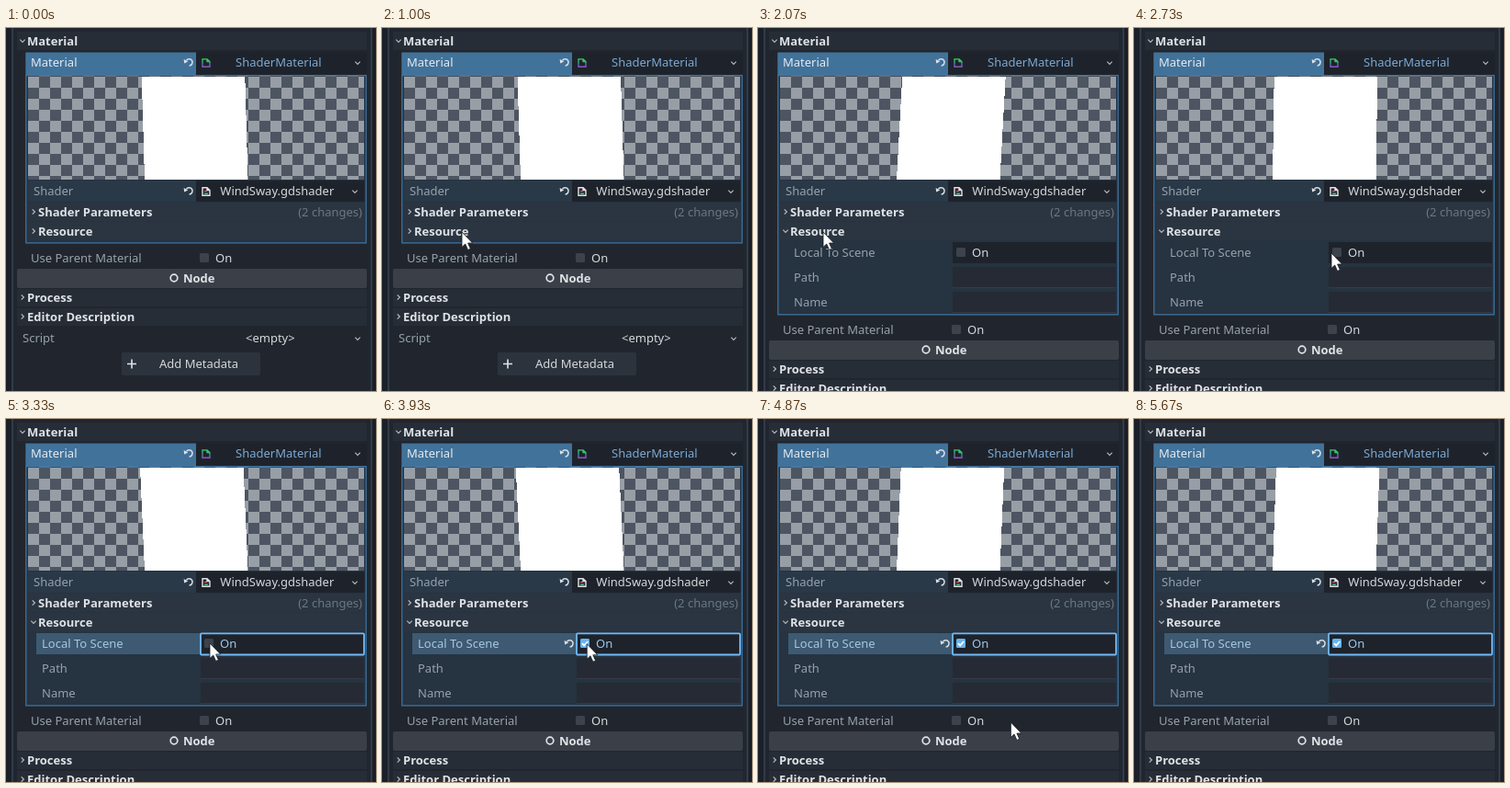
An HTML page that plays this animation: 403x395 px, repeating every 5.79 s.

```html
<!DOCTYPE html>
<html lang="en">
<head>
<meta charset="utf-8">
<title>Inspector</title>
<style>
  html, body { margin: 0; width: 100%; height: 100%; overflow: hidden; background: #21262e; }
  svg { display: block; width: 403px; height: 395px; }
  text { font: 13px "Noto Sans", "Open Sans", sans-serif; fill: #d5d8dc; white-space: pre; }
  .b { font-weight: 700; fill: #dfe2e6; }
  .dim { fill: #98a1ab; }
  .faint { fill: #6c7783; }
  .link { fill: #7da9d2; }
  .line { fill: none; stroke: #b4bac1; stroke-width: 1.2; }
  .sec { fill: #272d37; }
  .sub { fill: #2b3541; }
  .val { fill: #1e232b; }
  .field { fill: #252a35; }
  .box { fill: #3d434c; }
  .focus #on { fill: #9cc6ec; }
  .focus #localLabel { fill: #a9c6de; }
  #open, #focus, #checked, #arrow, #beam { visibility: hidden; }
</style>
</head>
<body>
<svg viewBox="0 0 403 395" id="stage">
  <defs>
    <pattern id="checker" x="24" y="53" width="24" height="24" patternUnits="userSpaceOnUse">
      <path fill="#4e5562" d="M0 0h24v24H0z"/>
      <path fill="#989ea5" d="M0 0h12v12H0zM12 12h12v12H12z"/>
    </pattern>
    <linearGradient id="rim" x1="0" y1="0" x2="0" y2="1">
      <stop offset="0" stop-color="#3fd05c"/>
      <stop offset=".45" stop-color="#3fae8c"/>
      <stop offset=".7" stop-color="#5a6ae0"/>
      <stop offset="1" stop-color="#a860d8"/>
    </linearGradient>
    <clipPath id="view"><path d="M24 52.5h366V165H24z"/></clipPath>
    <path id="right" class="line" d="M-1.3 -2.7L1.4 0L-1.3 2.7"/>
    <path id="down" class="line" d="M-2.7 -1.3L0 1.4L2.7 -1.3"/>
    <g id="undo">
      <path fill="none" stroke="#e0e3e7" stroke-width="1.5" d="M-2.6 -1.6A3.6 3.6 0 1 1 .6 3.9"/>
      <path fill="#e0e3e7" d="M-5.4 -3L-4.8 1.6L-.8 -.4z"/>
    </g>
    <path id="page" d="M-4 -4.2H1L4 -1.4V4.2H-4zM1 -4.2V-1.4H4"/>
  </defs>

  <path fill="#21262e" d="M0 0h403v395H0z"/>
  <path fill="#1b2028" d="M0 0h6v395H0zM399 0h4v395h-4z"/>
  <path fill="#303b49" d="M6 0h2v395H6zM397 0h2v395h-2z"/>

  <path class="sec" d="M12 4h381v20H12z"/>
  <use href="#down" x="18" y="14"/>
  <text class="b" x="23" y="19">Material</text>

  <path fill="#41729a" d="M21.3 26.5H207V51H21.3z"/>
  <path class="val" d="M207 26.5h185.5V51H207z"/>
  <text x="27" y="42" style="fill:#e6ebf0">Material</text>
  <use href="#undo" x="199" y="37"/>
  <use href="#page" x="218" y="38" fill="none" stroke="url(#rim)" stroke-width="1.3"/>
  <text class="link" x="250" y="42">ShaderMaterial</text>
  <use href="#down" x="383" y="38"/>

  <rect id="panel" x="21.8" y="51.6" width="370.4" height="182.3" fill="#263340" stroke="#3f78a8" stroke-width="1.2"/>
  <path fill="url(#checker)" d="M24 52.5h366V165H24z"/>
  <polygon id="quad" fill="#fff" clip-path="url(#view)" shape-rendering="crispEdges"/>

  <path fill="#293948" d="M24 166h183v23H24z"/>
  <path class="val" d="M207 166h183.5v23H207z"/>
  <text class="dim" x="30" y="182">Shader</text>
  <use href="#undo" x="199" y="177"/>
  <use href="#page" x="218" y="178" fill="none" stroke="#e0e3e7" stroke-width="1.4"/>
  <path fill="none" stroke-width="1.3" stroke="#e0566a" d="M216 177.5h3"/>
  <path fill="none" stroke-width="1.3" stroke="#48d07c" d="M216 180.2h4"/>
  <text x="233.3" y="182">WindSway.gdshader</text>
  <use href="#down" x="380" y="178"/>

  <path class="sub" d="M24 190h366v20H24zM24 211h366v20H24z"/>
  <use href="#right" x="30" y="200"/>
  <text class="b" x="35" y="205">Shader Parameters</text>
  <text class="faint" x="388" y="205" text-anchor="end">(2 changes)</text>
  <use id="fold" href="#right" x="30" y="221"/>
  <text class="b" x="35" y="226">Resource</text>

  <g id="open">
    <path class="val" d="M212 233h178v23H212z"/>
    <path class="field" d="M212 260h178v22H212zM212 287h178v22H212z"/>
    <path fill="none" stroke="#343a46" d="M212 282.5h178M212 309.5h178"/>
    <g id="focus">
      <path fill="#3d5a72" d="M33 233h179v23H33z"/>
      <rect x="212" y="233.3" width="178" height="23.2" rx="1" fill="#1e232b" stroke="#70bafa" stroke-width="1.8"/>
    </g>
    <text class="dim" id="localLabel" x="39" y="249">Local To Scene</text>
    <rect class="box" x="216" y="239" width="10" height="10" rx="1.5"/>
    <g id="checked">
      <use href="#undo" x="204" y="244"/>
      <rect x="216" y="239" width="10" height="10" rx="1.5" fill="#68b4f2"/>
      <path fill="none" stroke="#fff" stroke-width="1.8" d="M218 244.2l2.2 2.2l4 -4.4"/>
    </g>
    <text id="on" x="233" y="249">On</text>
    <text class="dim" x="39" y="276">Path</text>
    <text class="dim" x="39" y="303">Name</text>
  </g>

  <g id="lower">
    <text class="dim" x="27" y="255">Use Parent Material</text>
    <rect class="box" x="211" y="245" width="10" height="10" rx="1.5"/>
    <text x="228" y="255">On</text>
    <rect x="12" y="262" width="381" height="21" rx="2" fill="#3b4048"/>
    <circle cx="183" cy="272" r="3.8" fill="none" stroke="#e0e3e7" stroke-width="1.7"/>
    <text class="b" x="193" y="277">Node</text>
    <path class="sec" d="M12 284h381v19H12zM12 305h381v19H12z"/>
    <use href="#right" x="18" y="293"/>
    <text class="b" x="23" y="298">Process</text>
    <use href="#right" x="18" y="314"/>
    <text class="b" x="23" y="319">Editor Description</text>
    <text class="dim" x="18" y="342">Script</text>
    <text x="261" y="342">&lt;empty&gt;</text>
    <use href="#down" x="383" y="338"/>
    <rect x="126" y="353" width="151" height="25" rx="2" fill="#2d333d"/>
    <path fill="none" stroke="#e0e3e7" stroke-width="1.6" d="M132 365.5h10M137 360.5v10"/>
    <text x="167" y="370">Add Metadata</text>
  </g>

  <path id="arrow" fill="#fff" stroke="#15181d" stroke-width=".8" d="M0 0V16.5L3.7 13L6.6 19.4L9.4 18.2L6.6 12H11.6z"/>
  <path id="beam" fill="none" stroke="#d5d8dc" d="M-3.5 -8H3.5M0 -8V8M-3.5 8H3.5"/>
</svg>
<script>
  const LOOP = 5790, STEP = 1000 / 15, LAST = 85;
  const EXPAND = 2070, PRESS = 3270, RELEASE = 3400;
  const SHOW = 470, HIDE = 4970;

  // time, x, y of the pointer tip
  const path = [
    [470, 2, 355], [600, 2, 355], [870, 60, 262], [1000, 87, 222], [1200, 71, 222],
    [2130, 71, 222], [2600, 204, 243], [2730, 215, 245], [3200, 222, 244],
    [3800, 222, 244], [4330, 227, 247], [4400, 248, 247], [4470, 264.5, 283.5],
    [4730, 264.5, 283.5], [4930, 280, 350]
  ];

  const el = id => document.getElementById(id);
  const show = (id, on) => { el(id).style.visibility = on ? "visible" : "hidden"; };

  function pointer(t) {
    let i = 1;
    while (i < path.length - 1 && path[i][0] < t) i++;
    const [t0, x0, y0] = path[i - 1], [t1, x1, y1] = path[i];
    const k = Math.min(1, Math.max(0, (t - t0) / (t1 - t0)));
    return [x0 + (x1 - x0) * k, y0 + (y1 - y0) * k];
  }

  function draw(time) {
    const n = Math.min(LAST, Math.floor((time % LOOP + 5) / STEP));
    const t = Math.round(n * STEP / 10) * 10;

    const sway = 6.2 * Math.cos(2 * (t / 1000 - 2.085));
    el("quad").setAttribute("points",
      `${151 + sway},52.5 ${263.5 + sway},52.5 263.5,165 151,165`);

    const open = t >= EXPAND, focus = t >= PRESS;
    show("open", open);
    show("focus", focus);
    show("checked", t >= RELEASE);
    el("stage").classList.toggle("focus", focus);
    el("fold").setAttribute("href", open ? "#down" : "#right");
    el("panel").setAttribute("height", open ? 260.3 : 182.3);
    el("lower").setAttribute("transform", `translate(0 ${open ? 78 : 0})`);

    const [x, y] = pointer(t);
    const live = t >= SHOW && t < HIDE;
    const beam = open && x > 212 && y > 258 && y < 310;
    show("arrow", live && !beam);
    show("beam", live && beam);
    for (const id of ["arrow", "beam"]) el(id).setAttribute("transform", `translate(${x} ${y})`);
  }

  const start = performance.now();
  function tick() {
    draw(performance.now() - start);
    requestAnimationFrame(tick);
  }
  tick();
</script>
</body>
</html>
```
